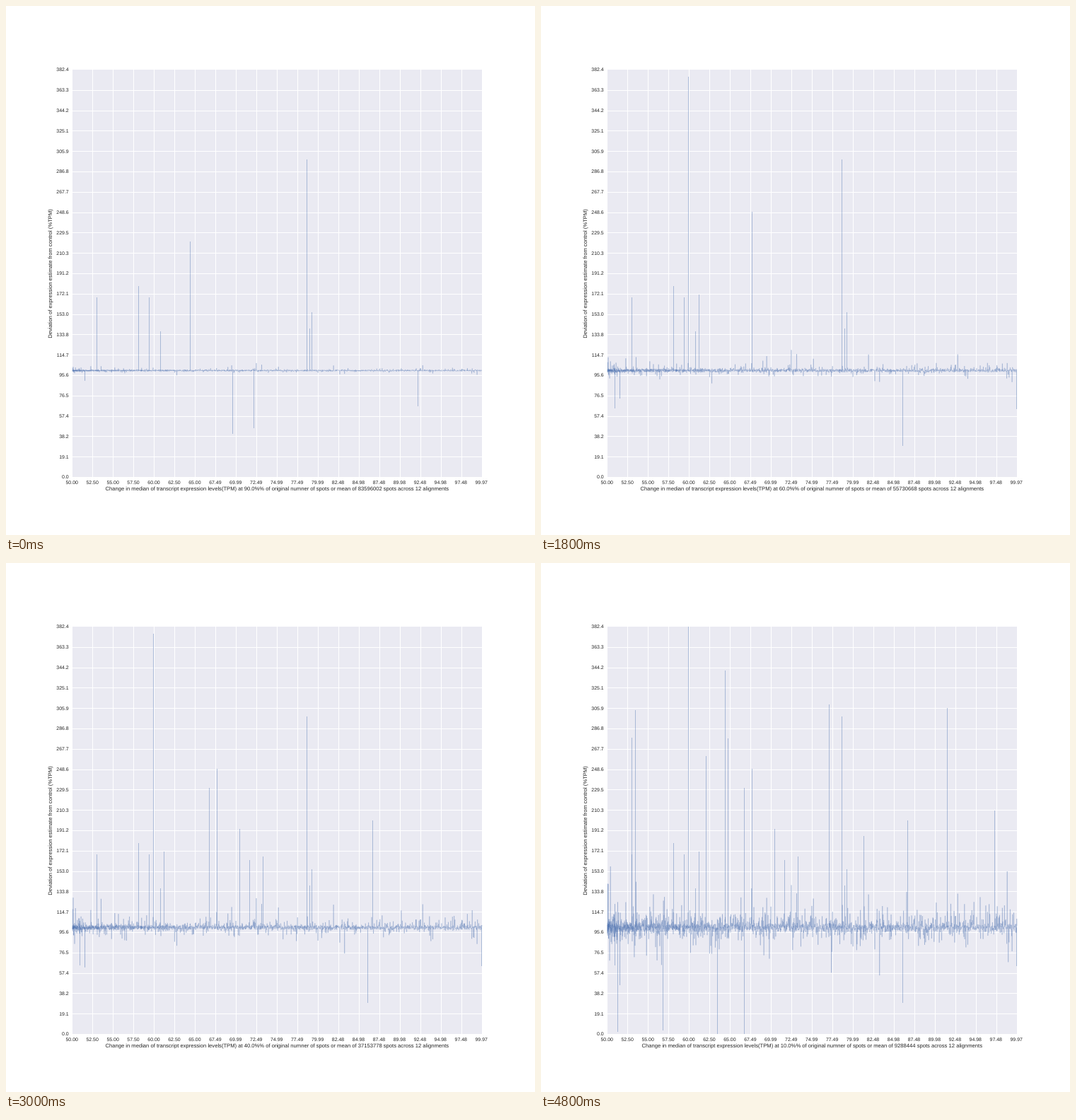
Write an HTML page that moves like this. It is 748 px wide and 748 px high and loops after 5400 ms.

```html
<!DOCTYPE html>
<html lang="en">
<head>
<meta charset="utf-8">
<title>Expression deviation</title>
<style>
  html, body { margin: 0; height: 100%; overflow: hidden; background: #fff; }
  svg { display: block; width: 100%; height: 100%; }
  text { font-family: "Liberation Sans", Arial, sans-serif; fill: #262626; text-rendering: geometricPrecision; }
  .tick { font-size: 6.94px; }
  .title { font-size: 7.64px; text-anchor: middle; }
  .grid { stroke: #fff; stroke-width: 1; }
  .data { fill: none; stroke: #4c72b0; stroke-linejoin: bevel; }
</style>
</head>
<body>
<svg viewBox="0 0 748 748">
  <rect x="94" y="90" width="579" height="576" fill="#eaeaf2"/>
  <g id="axes"></g>
  <path id="noise" class="data" stroke-width=".28"/>
  <path id="spikes" class="data" stroke-width=".42"/>
  <text id="caption" class="title" x="383.3" y="685.4"></text>
  <text class="title" transform="translate(65.3 378.5) rotate(-90)">Deviation of expression estimate from control (%TPM)</text>
</svg>
<script>
const LEFT = 94, RIGHT = 673, TOP = 90, BOTTOM = 666, BASE = 515.5;
const STEP_MS = 600, STEPS = 9, LAST = STEPS - 1, TOTAL_SPOTS = 92884447;

// Outliers: x, tip y, first step, last step (to the end if omitted)
const outliers = [
  [128, 412, 0], [187, 396, 0], [202, 412, 0], [425, 217, 0], [429, 456, 0], [432, 433, 0],
  [218, 460, 0], [260, 333, 0, 0], [320, 605, 0, 0], [350, 597, 0, 0], [582, 566, 0, 0],
  [208, 102, 1, 1], [208, 307, 2, 2], [208, 100, 3, 6], [208, 90, 8],
  [298, 291, 1], [223, 408, 2], [104, 569, 2], [511, 622, 2], [672, 570, 3],
  [287, 318, 4], [330, 376, 4], [344, 420, 4], [363, 415, 4], [518, 364, 4],
  [260, 152, 6], [233, 273, 6], [641, 350, 6], [172, 661, 6], [287, 666, 6],
  [133, 208, 7], [128, 247, 7], [264, 248, 7], [456, 386, 7], [249, 666, 7], [108, 663, 7],
  [407, 200, 8], [574, 205, 8]
];

const byId = id => document.getElementById(id);

function randomFrom(seed) {
  return () => {
    seed = (seed * 1664525 + 1013904223) >>> 0;
    return seed / 4294967296;
  };
}

// Heavy-tailed scatter that widens as fewer spots are kept; dense on the left
function noisePath(step) {
  const random = randomFrom(77), count = 2600;
  const spread = .1 * 1.49 ** step, limit = 15 + 9 * step, core = 1 + .3 * step;
  let d = "";
  for (let i = 0; i < count; i++) {
    const x = LEFT + (RIGHT - LEFT) * (i / (count - 1)) ** 1.35;
    const tail = spread * Math.tan(Math.PI / 2 * random());
    const reach = limit * (.15 + .85 * random() ** 3);
    const sign = random() < .58 ? -1 : 1;
    const y = BASE + (random() - .5) * 2 * core + sign * Math.min(tail, reach);
    d += (i ? "L" : "M") + x.toFixed(2) + " " + y.toFixed(2);
  }
  return d;
}

function spikesPath(step) {
  return outliers
    .filter(([, , first, last = LAST]) => step >= first && step <= last)
    .map(([x, y]) => `M${x + .5} ${BASE}V${y}`)
    .join("");
}

function caption(step) {
  const tenths = STEPS - step;
  const spots = Math.floor(TOTAL_SPOTS * tenths / 10);
  return `Change in median of transcript expression levels(TPM) at ${tenths}0.0%% of original numner of spots or mean of ${spots} spots across 12 alignments`;
}

function drawAxes() {
  let markup = "";
  for (let i = 0; i <= 20; i++) {
    const x = 93.5 + 28.95 * i, y = BOTTOM - 28.8 * i;
    const gridX = Math.floor(x + .5) + (i % 20 ? .5 : 0), gridY = Math.round(y) + .5;
    const xLabel = (Math.ceil((50 + 2.49846 * i) * 100) / 100).toFixed(2);
    const yLabel = (19.121 * i).toFixed(1);
    if (i % 20) {
      markup += `<path class="grid" d="M${gridX} ${TOP}V${BOTTOM}M${LEFT} ${gridY}H${RIGHT}"/>`;
    }
    markup += `<text class="tick" text-anchor="middle" x="${x - .3}" y="675.5">${xLabel}</text>`;
    markup += `<text class="tick" text-anchor="end" x="88.7" y="${y + 2.4}">${yLabel}</text>`;
  }
  byId("axes").innerHTML = markup;
}

const scenes = Array.from({ length: STEPS }, (_, step) => ({
  noise: noisePath(step), spikes: spikesPath(step), caption: caption(step)
}));
let shown = -1;

function show(step) {
  if (step === shown) return;
  shown = step;
  byId("noise").setAttribute("d", scenes[step].noise);
  byId("spikes").setAttribute("d", scenes[step].spikes);
  byId("caption").textContent = scenes[step].caption;
}

drawAxes();
show(0);
const start = performance.now();
function tick() {
  show(Math.floor((performance.now() - start) / STEP_MS) % STEPS);
  requestAnimationFrame(tick);
}
requestAnimationFrame(tick);
</script>
</body>
</html>
```
